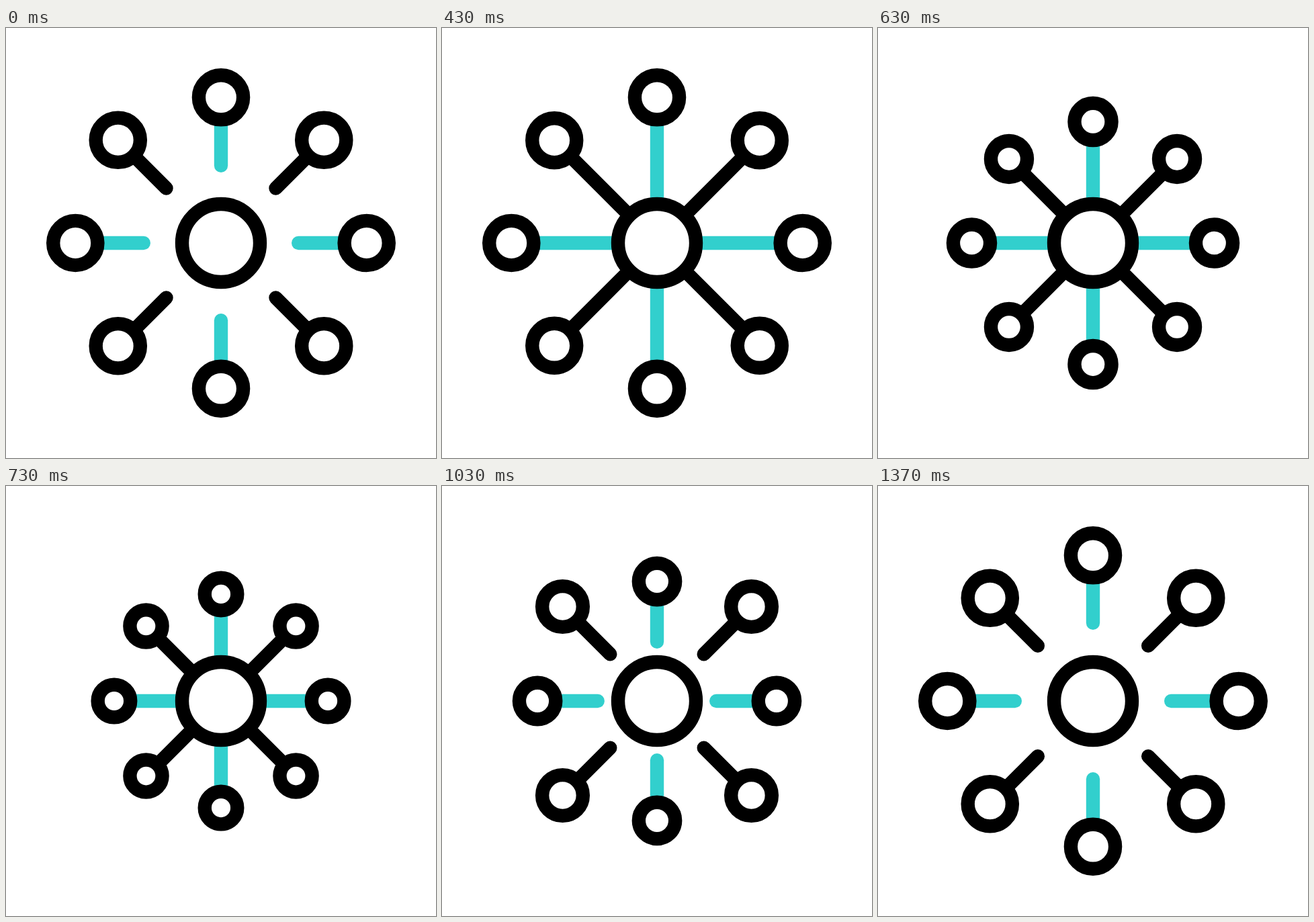
Write an HTML page that moves like this. It is 640 px wide and 640 px high and loops after 1.67 s.

```html
<!DOCTYPE html>
<html lang="en">
<head>
<meta charset="utf-8">
<title>Hub and nodes</title>
<style>
  html, body { margin: 0; width: 100%; height: 100%; overflow: hidden; background: #fff; }
  svg { display: block; width: 100%; height: 100%; }
  circle { fill: #fff; stroke: #000; stroke-width: 20.4; }
  line { stroke-width: 20.4; stroke-linecap: round; }
</style>
</head>
<body>
<svg viewBox="0 0 640 640"><g id="stage" transform="translate(320 320)"></g></svg>
<script>
const LOOP = 1670, LAST = 41;
const DIST = 216.7, RADIUS = 33.1, HUB = 58, REST = 116.2;

// Scale of each ring of nodes: [step, scale]
const STRAIGHT = [[13.5, 1], [16, .936], [19, .833], [22, .734], [24.5, .666],
  [26, .676], [28, .733], [31, .821], [34, .891], [38, .963], [41, 1]];
const DIAGONAL = [[12.8, 1], [16, .925], [19, .816], [21, .749], [22.8, .72],
  [24, .73], [26, .778], [31, .917], [34, .9755], [37.5, 1]];

const stage = document.getElementById('stage');

function add(tag, parent, attrs) {
  const el = document.createElementNS('http://www.w3.org/2000/svg', tag);
  for (const key in attrs) el.setAttribute(key, attrs[key]);
  return parent.appendChild(el);
}

const spokes = Array.from({ length: 8 }, (_, i) => {
  const diagonal = i % 2 === 1;
  const g = add('g', stage, { transform: `rotate(${i * 45})` });
  return {
    diagonal,
    line: add('line', g, { y1: 0, y2: 0, stroke: diagonal ? '#000' : '#32cfcd' }),
    node: add('circle', g, { cy: 0 })
  };
});
add('circle', stage, { r: HUB });

// Monotone cubic through the points
function curve(pts, x) {
  const end = pts.length - 1;
  if (x <= pts[0][0]) return pts[0][1];
  if (x >= pts[end][0]) return pts[end][1];
  const rise = i => (pts[i + 1][1] - pts[i][1]) / (pts[i + 1][0] - pts[i][0]);
  const slope = i => {
    if (i === 0) return rise(0) * .6;
    if (i === end) return rise(end - 1) * .6;
    const a = rise(i - 1), b = rise(i);
    return a * b > 0 ? 2 * a * b / (a + b) : 0;
  };
  let i = 0;
  while (x > pts[i + 1][0]) i++;
  const h = pts[i + 1][0] - pts[i][0], u = (x - pts[i][0]) / h, v = 1 - u;
  return v * v * (1 + 2 * u) * pts[i][1] + u * u * (3 - 2 * u) * pts[i + 1][1]
    + h * u * v * (v * slope(i) - u * slope(i + 1));
}

// Inner end of the spokes before scaling
function innerEnd(step) {
  if (step < 18) {
    const u = Math.min(1, (step + 1) / 13);
    return REST - (REST - HUB) * u * u * (3 - 2 * u);
  }
  const left = Math.max(0, 40 - step);
  return Math.max(HUB, REST - .107 * left * left);
}

function draw(ms) {
  // 30 steps per second on a 10 ms grid, then a hold
  const step = Math.min(LAST, Math.floor((Math.floor(ms / 10) + .5) * .3));
  const inner = innerEnd(step);
  const straight = curve(STRAIGHT, step), diagonal = curve(DIAGONAL, step);
  for (const s of spokes) {
    const k = s.diagonal ? diagonal : straight;
    s.line.setAttribute('x1', inner * k);
    s.line.setAttribute('x2', DIST * k);
    s.node.setAttribute('cx', DIST * k);
    s.node.setAttribute('r', RADIUS * k);
  }
}

const start = performance.now();
function tick() {
  draw((performance.now() - start) % LOOP);
  requestAnimationFrame(tick);
}
tick();
</script>
</body>
</html>
```
